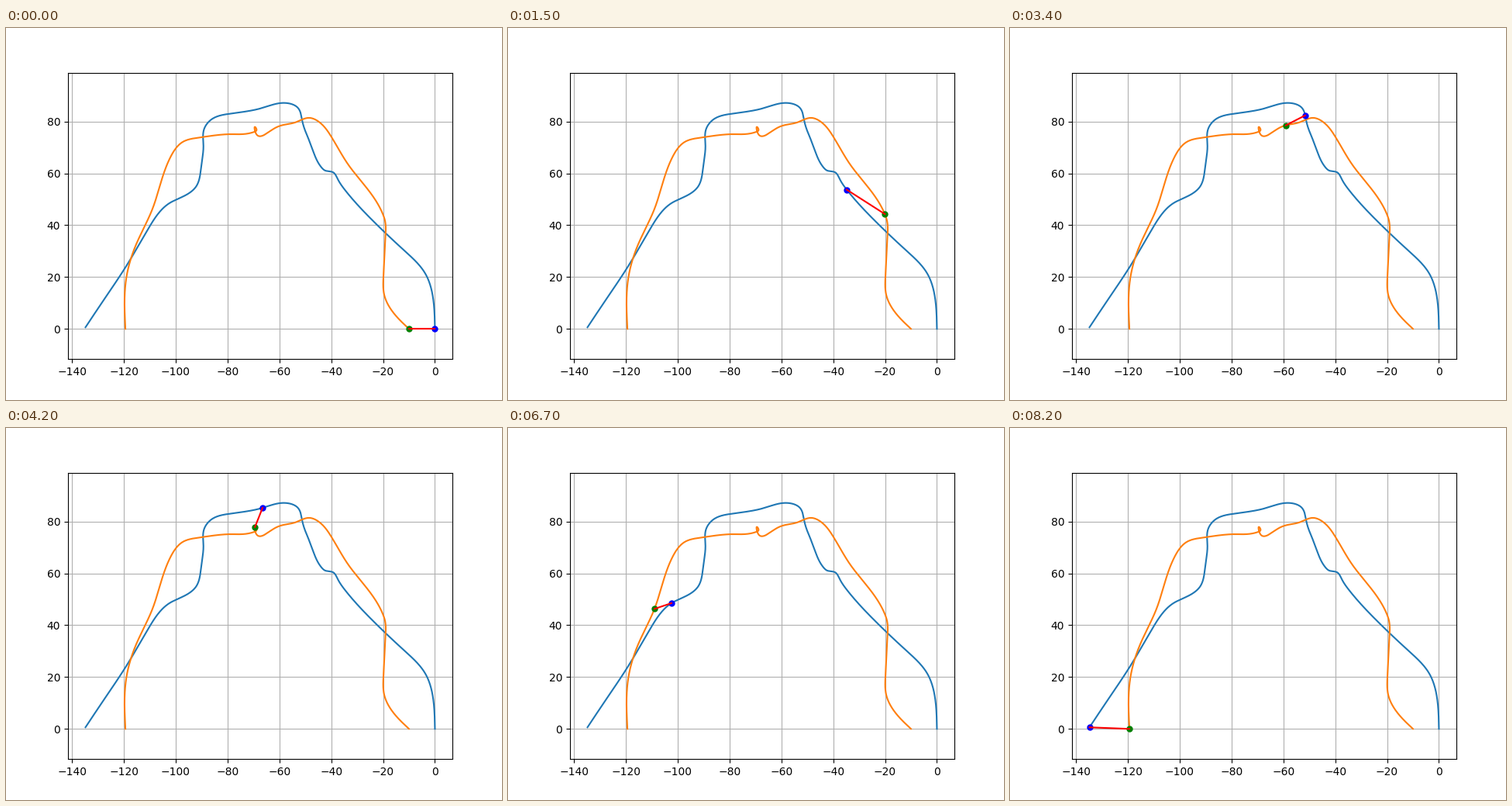
A matplotlib script that plays this animation: 640 by 480 pixels, repeating every 10 s.

```python
import numpy as np
import matplotlib.pyplot as plt
from matplotlib.animation import FuncAnimation

FRAMES, INTERVAL, LAST_STEP = 100, 100, 82

# step: the point reached at that step, then waypoints on the way to the next
BLUE = {
    0: [(0, 0), (-0.5, 10.2), (-3.7, 21.3), (-11.8, 30.2), (-22, 39.8)],
    15: [(-34.8, 53.7), (-37.5, 57.8), (-39.3, 60.4), (-42.4, 61.1)],
    26: [(-43.7, 62.2), (-48, 71.4)],
    33: [(-51.1, 79.9), (-52.8, 85.2), (-57.8, 87.15)],
    42: [(-66.5, 85.25), (-79.4, 82.95), (-86.2, 80.8), (-89.1, 76.9),
         (-89.3, 70.6)],
    57: [(-90.1, 63.1), (-92.2, 54.8), (-96.1, 51.6)],
    67: [(-102.4, 48.5), (-111.05, 37.8), (-119.4, 23.7), (-128.4, 10.2)],
    LAST_STEP: [(-134.8, 0.6)],
}
ORANGE = {
    0: [(-10, 0), (-16, 6.2), (-19.55, 13.1), (-19.85, 20.4), (-19.1, 35.3),
        (-19.3, 41.9)],
    15: [(-20.1, 44.3), (-24.9, 52.5), (-33.6, 63.6), (-40.2, 74.5)],
    26: [(-44.4, 79.6), (-48.6, 81.4), (-53.7, 79.7), (-62, 77.3),
         (-69.1, 75.5)],
    42: [(-69.4, 77.9), (-68.8, 76.7), (-69.8, 75.95), (-78.8, 75.1)],
    57: [(-90.95, 73.8), (-97.3, 72.1), (-102.1, 66.1)],
    67: [(-108.95, 46.3), (-115.25, 32.6), (-119.1, 19.3)],
    LAST_STEP: [(-119.4, 0)],
}


def hermite(t, knots, values, slopes):
    i = np.clip(np.searchsorted(knots, t, side="right") - 1, 0, len(knots) - 2)
    h = knots[i + 1] - knots[i]
    u = (t - knots[i]) / h
    return ((1 + 2 * u) * (1 - u) ** 2 * values[i]
            + u * (1 - u) ** 2 * h * slopes[i]
            + u ** 2 * (3 - 2 * u) * values[i + 1]
            + u ** 2 * (u - 1) * h * slopes[i + 1])


def spline_slopes(knots, values):
    """Knot slopes of the natural cubic spline."""
    n, h = len(knots), np.diff(knots)
    rate = np.diff(values) / h
    matrix, rhs = np.zeros((n, n)), np.zeros(n)
    matrix[0, :2], rhs[0] = (2, 1), 3 * rate[0]
    matrix[-1, -2:], rhs[-1] = (1, 2), 3 * rate[-1]
    for i in range(1, n - 1):
        matrix[i, i - 1:i + 2] = h[i], 2 * (h[i - 1] + h[i]), h[i - 1]
        rhs[i] = 3 * (h[i] * rate[i - 1] + h[i - 1] * rate[i])
    return np.linalg.solve(matrix, rhs)


def monotone_slopes(knots, values):
    rate = np.diff(values) / np.diff(knots)
    inner = 2 * rate[:-1] * rate[1:] / (rate[:-1] + rate[1:])
    return np.concatenate([rate[:1], inner, rate[-1:]])


def trace(route):
    """The whole curve and the walker's position at every step."""
    points = np.array(sum(route.values(), []), float)
    chords = np.hypot(*np.diff(points, axis=0).T)
    knots = np.concatenate([[0], np.cumsum(chords)])

    def curve(t):
        return np.array([hermite(t, knots, c, spline_slopes(knots, c))
                         for c in points.T])

    steps = np.array(list(route), float)
    sizes = [len(stretch) for stretch in route.values()]
    reached = knots[np.cumsum([0] + sizes[:-1])]
    progress = hermite(np.arange(LAST_STEP + 1), steps, reached,
                       monotone_slopes(steps, reached))
    return curve(np.linspace(0, knots[-1], 2000)), curve(progress)


blue, blue_walk = trace(BLUE)
orange, orange_walk = trace(ORANGE)

fig, ax = plt.subplots(figsize=(6.4, 4.8), dpi=100)
ax.plot(*blue, color="C0")
ax.plot(*orange, color="C1")
blue_dot, = ax.plot([], [], "o", color="blue", markersize=5)
green_dot, = ax.plot([], [], "o", color="green", markersize=5)
leash, = ax.plot([], [], color="red")
ax.set_xlim(-141.54, 6.74)
ax.set_ylim(-11.65, 98.84)
ax.grid(True)


def update(frame):
    step = min(frame, LAST_STEP)
    b, g = blue_walk[:, step], orange_walk[:, step]
    blue_dot.set_data(b[:1], b[1:])
    green_dot.set_data(g[:1], g[1:])
    leash.set_data(*zip(b, g))
    return blue_dot, green_dot, leash


anim = FuncAnimation(fig, update, frames=FRAMES, interval=INTERVAL,
                     repeat=True, repeat_delay=0)
plt.show()
```
